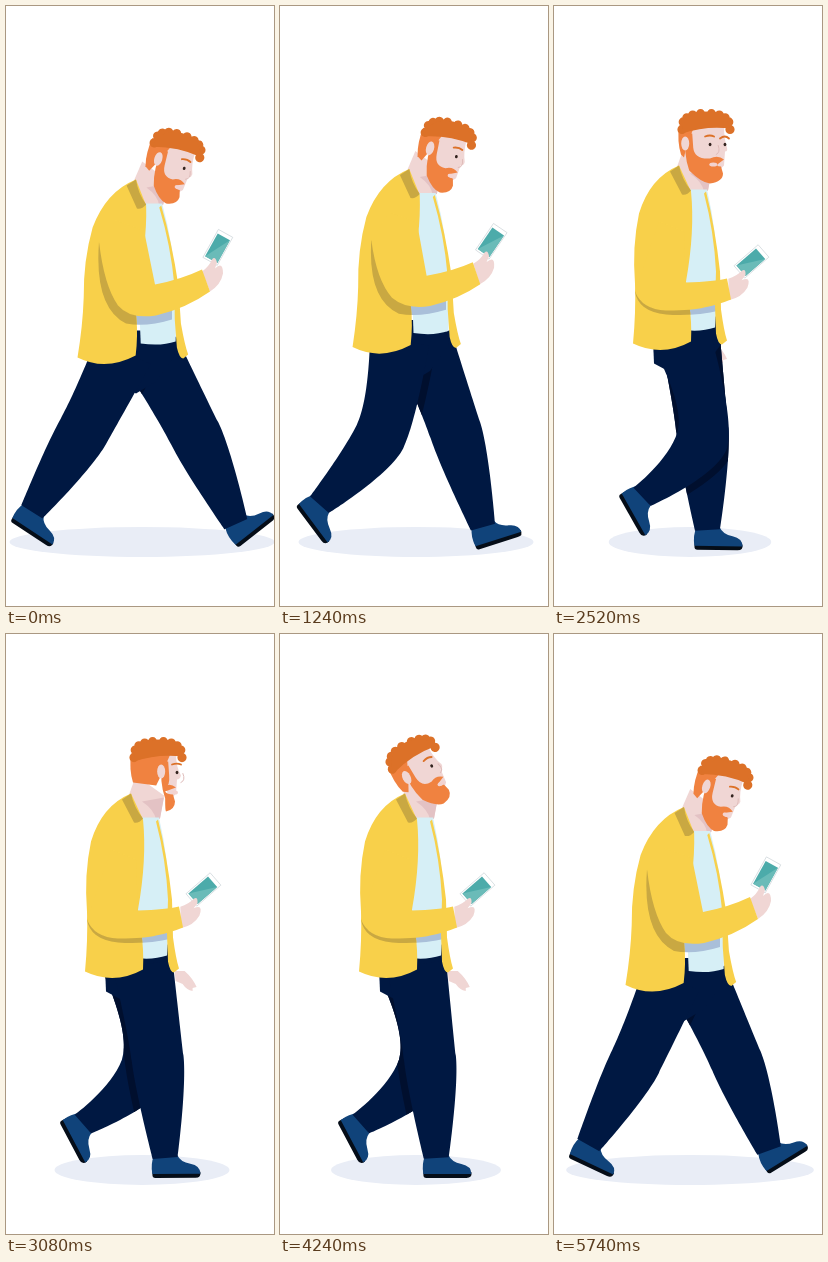
Write an HTML page with a canvas that moves like this. It is 268 px wide and 600 px high and loops after 5.76 s.

```html
<!DOCTYPE html>
<html lang="en">
<head>
<meta charset="utf-8">
<title>Walking man</title>
<style>
  html, body { margin: 0; width: 100%; height: 100%; overflow: hidden; background: #fff; }
  canvas { display: block; width: 268px; height: 600px; }
</style>
</head>
<body>
<canvas id="stage"></canvas>
<script>
const W = 268, H = 600, LOOP = 5760, STRIDE = 1152;
const NAVY = '#001842', YELLOW = '#f8d04a', OCHRE = '#c9a842', SHIRT = '#d6eff6';
const SKIN = '#f0d6d4', BLUSH = '#e3c2c4', HAIR = '#dc7128', BEARD = '#f08240';

const canvas = document.getElementById('stage');
const ctx = canvas.getContext('2d');
const dpr = window.devicePixelRatio || 1;
canvas.width = W * dpr;
canvas.height = H * dpr;

const { sin, cos, PI, max, atan2 } = Math;
const rad = deg => deg * PI / 180;
const lerp = (a, b, k) => a + (b - a) * k;

function ease(t, from, to) {
  const k = Math.min(1, max(0, (t - from) / (to - from)));
  return k * k * (3 - 2 * k);
}

// Smooth curve without overshoot through keys [time, value, value...], period 1
function track(keys) {
  const n = keys.length;
  const time = i => keys[(i + n) % n][0] + Math.floor(i / n);
  const value = (i, c) => keys[(i + n) % n][c];
  const rise = (i, c) => (value(i + 1, c) - value(i, c)) / (time(i + 1) - time(i));
  const slope = (i, c) => {
    const a = rise(i - 1, c), b = rise(i, c);
    return a * b <= 0 ? 0 : 2 * a * b / (a + b);
  };
  return t => {
    t %= 1;
    let i = n - 1;
    while (time(i) > t) i--;
    const d = time(i + 1) - time(i), k = (t - time(i)) / d, l = 1 - k;
    return keys[0].slice(1).map((_, j) => {
      const c = j + 1;
      return lerp(value(i, c), value(i + 1, c), k * k * (3 - 2 * k))
        + d * k * l * (slope(i, c) * l - slope(i + 1, c) * k);
    });
  };
}

// Ankle x, y and foot angle over one stride, from heel strike
const ankleAt = track([
  [0, 230, 518, -38], [.075, 204, 521, -18], [.18, 157, 524, 0], [.46, 54, 518, 16],
  [.5, 26, 506, 33], [.575, 39, 499, 53], [.68, 80, 490, 62], [.701, 101, 493, 56],
  [.962, 188, 514, -18]
]);

// Blend two path strings of the same structure
function mix(a, b, k) {
  const to = b.match(/-?\d+/g);
  let i = 0;
  return a.replace(/-?\d+/g, v => lerp(+v, +to[i++], k).toFixed(2));
}

// Path sheared sideways around height y
function shear(path, k, y) {
  const p = new Path2D();
  p.addPath(new Path2D(path), new DOMMatrix([1, 0, -k, 1, k * y, 0]));
  return p;
}

const shape = path => path instanceof Path2D ? path : new Path2D(path);

function fill(path, color) {
  ctx.fillStyle = color;
  ctx.fill(shape(path));
}

function line(path, color, width) {
  ctx.strokeStyle = color;
  ctx.lineWidth = width;
  ctx.lineCap = 'round';
  ctx.stroke(shape(path));
}

function oval(x, y, rx, ry, color) {
  ctx.fillStyle = color;
  ctx.beginPath();
  ctx.ellipse(x, y, rx, ry, 0, 0, 2 * PI);
  ctx.fill();
}

function at(x, y, deg, draw) {
  ctx.save();
  ctx.translate(x, y);
  ctx.rotate(rad(deg));
  draw();
  ctx.restore();
}

function clipped(path, draw) {
  ctx.save();
  ctx.clip(path);
  draw();
  ctx.restore();
}

// Tapered trouser leg; the knee bends forward while the foot swings
function legShape(v, bob) {
  const hip = [131 + 13 * cos(2 * PI * v), 345 + bob], ankle = ankleAt(v);
  const aim = atan2(ankle[1] - hip[1], ankle[0] - hip[0]);
  const bend = max(4, -45 * sin(2 * PI * v));
  const knee = [
    lerp(hip[0], ankle[0], .48) + bend * sin(aim),
    lerp(hip[1], ankle[1], .48) - bend * cos(aim) + bend * .4
  ];
  const thigh = atan2(knee[1] - hip[1], knee[0] - hip[0]);
  const shin = atan2(ankle[1] - knee[1], ankle[0] - knee[0]);
  const mid = (thigh + shin) / 2, dx = 30 * cos(mid), dy = 30 * sin(mid);
  const side = (p, a, r) => [p[0] + r * sin(a), p[1] - r * cos(a)];
  const edge = s => {
    const p = side(hip, thigh, 30 * s), q = side(knee, mid, 26 * s), r = side(ankle, shin, 12.5 * s);
    return { p, q, r, above: [q[0] - dx, q[1] - dy], below: [q[0] + dx, q[1] + dy] };
  };
  const f = edge(1), b = edge(-1), path = new Path2D();
  path.moveTo(...f.p);
  path.bezierCurveTo(...f.p, ...f.above, ...f.q);
  path.bezierCurveTo(...f.below, ...f.r, ...f.r);
  path.lineTo(...b.r);
  path.bezierCurveTo(...b.r, ...b.below, ...b.q);
  path.bezierCurveTo(...b.above, ...b.p, ...b.p);
  path.closePath();
  return path;
}

function drawShoe(v) {
  const [x, y, deg] = ankleAt(v);
  at(x, y, deg, () => {
    fill('M-13 12 L-13 17 Q-13 20 -10 20 L30 20 Q36 20 35 14Z', '#050d18');
    fill('M-11 -3 L12 -3 Q15 4 25 6 Q35 8 35 16 L-13 16 Q-15 6 -11 -3Z', '#10437a');
  });
}

function drawLegs(u, bob) {
  const far = legShape(u, bob), near = legShape(u + .5, bob);
  drawShoe(u);
  fill(far, NAVY);
  clipped(far, () => line(near, '#000f2e', 14));
  at(0, bob, 0, () => fill('M98 325 L164 325 L169 350 L150 376 L130 388 L100 372Z', NAVY));
  drawShoe(u + .5);
  fill(near, NAVY);
}

// Features sit on a round head; facing is 0 toward the viewer, 90 to the right
function drawHead(x, y, tilt, facing) {
  const lon = deg => 25 * sin(rad(facing + deg));
  const turn = sin(rad(facing));
  const ear = lon(-90), burn = ear + 2, mouth = 19 * turn;
  at(x, y, tilt, () => {
    fill(`M${ear} -20 L18 -19 Q18 -7 ${19 + 4 * turn} 2 Q22 6 19 6 L18 20 Q6 34 ${ear + 8} 24Z`, SKIN);
    fill(`M-27 -20 Q-29 -4 -25 9 L${max(-22, ear - 4)} 12 Q${ear + 2} 0 ${ear + 10} -19Z`, BEARD);
    fill(`M${burn} -12 Q${burn - 3} 8 ${burn + 3} 25 Q${burn / 2 + 5} 37 ${8 * turn} 38
      Q17 36 17 28 L15 21 Q9 21 ${18 - 11 * turn} 18 L18 14 Q12 9 ${lerp(2, 6, turn)} 13
      Q${burn + 8} 14 ${burn + 7} 2 L${burn + 6} -12Z`, BEARD);
    oval(ear + 1, -2, 4, 7, SKIN);
    oval(mouth - 2, 19, 5 - 2 * turn, 2, '#f3d3d0');
    line(`M${lon(0)} 0 q${2 + turn} 7 -2 9`, '#dfbcba', 1);
    for (const s of [-20, 20]) {
      if (facing + s > 65 && s > 0) continue;
      const ex = Math.min(19, lon(s));
      oval(ex, -1, 1.4, 1.7, '#33231f');
      line(`M${ex - 5} ${-8 + s / 20} Q${ex} -11 ${ex + 4} ${-8 + s / 20}`, HAIR, 1.8);
    }
    ctx.beginPath();
    const curls = 10;
    for (let i = 0; i < curls; i++) {
      const a = PI * (1 - i / (curls - 1));
      const cx = 24 * Math.sign(cos(a)) * Math.abs(cos(a)) ** .85, cy = -16 - 16 * sin(a) ** .7;
      ctx.moveTo(cx, cy);
      ctx.arc(cx, cy, 4.6, 0, 2 * PI);
    }
    ctx.fillStyle = HAIR;
    ctx.fill();
    fill('M-24 -16 Q-22 -32 0 -34 Q22 -32 24 -17 Q0 -20 -24 -12Z', HAIR);
  });
}

function drawPhone(lift) {
  at(lerp(175, 200, lift), lerp(297, 275, lift), 20 * (1 - lift * lift), () => {
    at(12, -33, 29, () => {
      fill('M-8 -16 h16 v32 h-16Z', '#fff');
      line('M-8 -16 h16 v32 h-16Z', '#cfd6da', .7);
      fill('M-7 -12 h14 v26 h-14Z', '#4cabaa');
      fill('M7 -12 v26 h-14Z', '#6abbb8');
    });
    fill('M-4 -9 Q3 -14 6 -21 Q9 -25 11 -18 L9 -12 Q17 -20 17 -7 Q15 4 4 11Z', SKIN);
  });
}

function drawTorso(lean, lift) {
  const open = path => shear(path, -.04 * lean, 120);
  const back = path => shear(path, .07 * lean, 245);
  const jacket = back('M125 174 Q96 186 85 222 Q78 255 81 292 Q82 320 79 352 Q108 366 137 350 Q138 330 135 312 L132 290 Q141 240 137 200Z');
  const fold = mix(
    'M81 300 Q84 320 112 323 Q140 325 166 319 L166 305 L120 290Z',
    'M93 236 Q88 302 120 318 Q140 322 166 314 L166 300 L120 290Z', lift);

  fill(back('M130 156 L122 178 L138 206 L154 199 L158 176Z'), SKIN);
  fill(back('M136 182 Q148 190 150 200 L154 199 L158 178Z'), BLUSH);
  fill(open('M130 198 L153 198 Q163 240 164 290 L161 336 Q146 341 126 338 L126 300Z'), SHIRT);
  fill(fold, '#a9bfd9');
  fill(open('M152 200 Q161 235 166 280 L167 318 Q170 340 173 349 L168 353 Q164 353 162 342 L161 314 L162 280 Q160 240 150 202Z'), YELLOW);
  fill(jacket, YELLOW);
  clipped(jacket, () => fill(fold, OCHRE));
  fill(back('M125 174 L116 180 L128 203 Q133 204 137 199 Q128 188 125 174Z'), OCHRE);
}

function drawSleeve(lift) {
  fill(mix(
    'M81 300 Q88 318 112 319 Q140 319 150 316 Q165 313 177 308 L173 287 Q160 290 132 291 L130 240 L105 230Z',
    'M93 236 Q98 280 112 300 Q124 314 150 310 Q180 303 204 286 L196 264 Q175 274 149 279 L138 225 L110 215Z',
    lift), YELLOW);
}

function draw(t) {
  const u = (t % STRIDE) / STRIDE, step = (u * 2) % 1;
  const bob = -14.5 * sin(PI * step ** .7);
  const spread = Math.abs(ankleAt(u)[0] - ankleAt(u + .5)[0]);

  // Phone, a glance at the viewer, a glance away, up to the sky, back to the phone
  const drop = ease(t, 1100, 1700), up = ease(t, 3500, 3950), back = ease(t, 4830, 5250);
  const lean = 1 - drop + back, lift = 1 - drop + ease(t, 4950, 5370), sky = up - back;
  const facing = 50 - 45 * ease(t, 1300, 1750) + 90 * ease(t, 2350, 2850) - 45 * up;

  ctx.setTransform(dpr, 0, 0, dpr, 0, 0);
  ctx.fillStyle = '#fff';
  ctx.fillRect(0, 0, W, H);

  oval(136, 536, 57 + .37 * spread, 15, '#e9edf6');
  at(170 - 21 * cos(2 * PI * u), 347, 0, () =>
    fill('M-11 -10 L-1 -10 Q7 -3 11 6 L7 7 L7 10 Q1 9 -3 3 L-10 0Z', SKIN));
  drawLegs(u, bob);

  ctx.translate(0, bob);
  drawTorso(lean, lift);
  drawHead(152 + 14 * lean - 11 * sky, 154 + 6 * lean - sky, 18 * lean - 27 * sky, facing);
  drawPhone(lift);
  drawSleeve(lift);
}

function frame() {
  draw(performance.now() % LOOP);
  requestAnimationFrame(frame);
}
frame();
</script>
</body>
</html>
```
